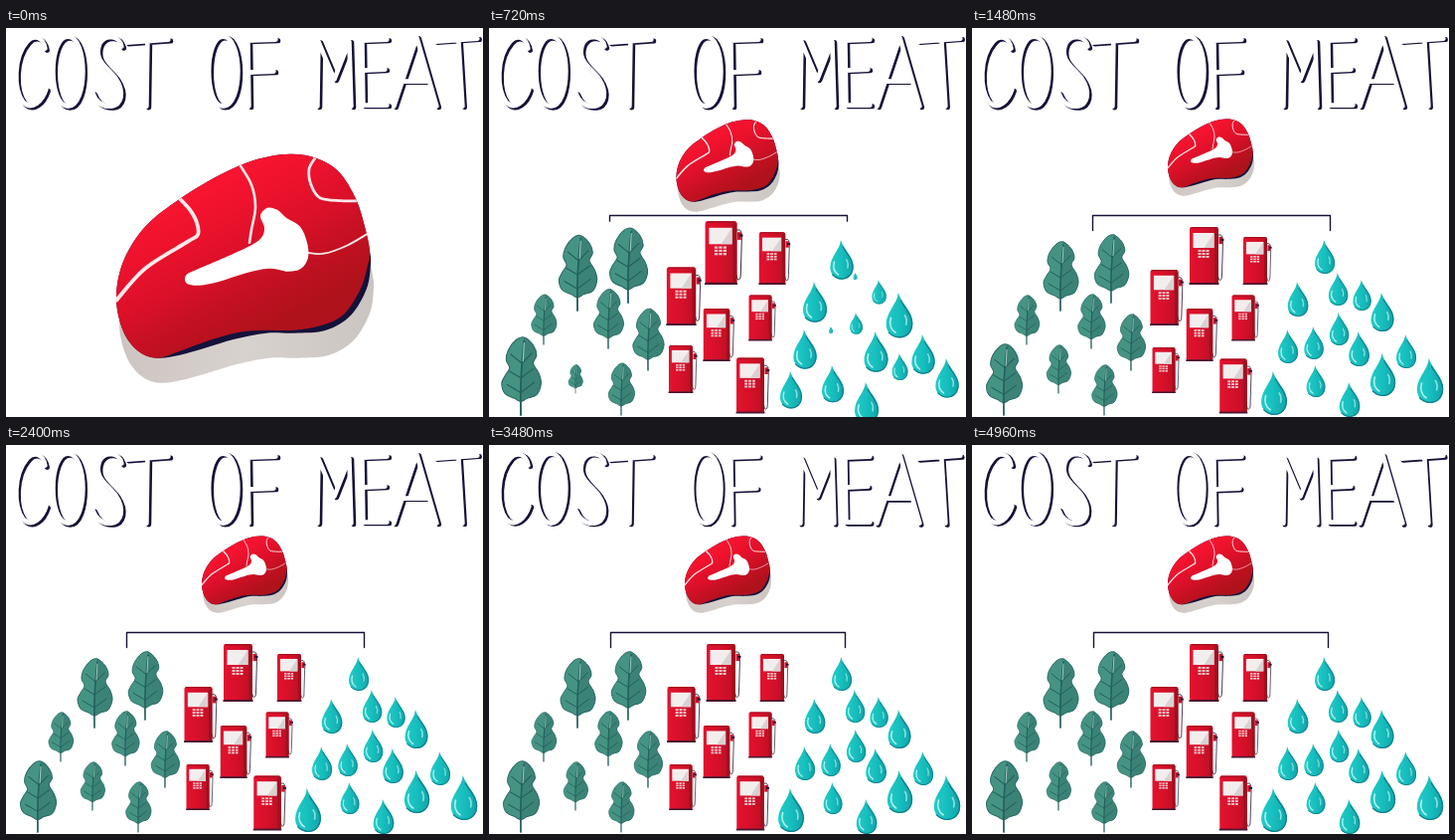
An HTML page with a canvas that plays this animation: 480x391 px, repeating every 5000 ms.

```html
<!DOCTYPE html>
<html lang="en">
<head>
<meta charset="utf-8">
<title>Cost of meat</title>
<style>
html, body { margin: 0; width: 100%; height: 100%; overflow: hidden; background: #fff; }
canvas { display: block; }
</style>
</head>
<body>
<canvas id="stage" width="480" height="391" role="img" aria-label="COST OF MEAT"></canvas>
<script>
const ctx = document.getElementById('stage').getContext('2d');
const LOOP = 5000, NAVY = '#15123a';
const clamp = v => Math.max(0, Math.min(1, v));
const easeOut = (u, p) => 1 - (1 - clamp(u)) ** p;
const easeInOut = (u, p) => {
  u = clamp(u);
  return u < .5 ? (2 * u) ** p / 2 : 1 - (2 - 2 * u) ** p / 2;
};
const pop = (ms, start, c) => {
  if (ms <= start) return 0;
  const v = clamp((ms - start) / 400) - 1;
  return 1 + (c + 1) * v ** 3 + c * v * v;
};

// Smooth path through "x,y x,y ..." points.
function curve(text, closed) {
  const p = text.split(' ').map(s => s.split(',').map(Number)), n = p.length;
  const at = i => closed ? p[(i + n) % n] : p[Math.max(0, Math.min(n - 1, i))];
  const path = new Path2D();
  path.moveTo(...p[0]);
  for (let i = 0; i < (closed ? n : n - 1); i++) {
    const [a, b, c, d] = [at(i - 1), at(i), at(i + 1), at(i + 2)];
    path.bezierCurveTo(b[0] + (c[0] - a[0]) / 6, b[1] + (c[1] - a[1]) / 6,
      c[0] - (d[0] - b[0]) / 6, c[1] - (d[1] - b[1]) / 6, c[0], c[1]);
  }
  if (closed) path.closePath();
  return path;
}
const fill = (path, color) => { ctx.fillStyle = color; ctx.fill(path); };
const line = (path, color, width) => {
  ctx.strokeStyle = color;
  ctx.lineWidth = width;
  ctx.stroke(path);
};
const rect = (x, y, w, h, color) => { ctx.fillStyle = color; ctx.fillRect(x, y, w, h); };
function placed(x, y, scale, draw) {
  if (scale <= 0) return;
  ctx.save();
  ctx.translate(x, y);
  ctx.scale(scale, scale);
  draw();
  ctx.restore();
}
function gradient(x0, y0, x1, y1, ...stops) {
  const g = ctx.createLinearGradient(x0, y0, x1, y1);
  stops.forEach((c, i) => g.addColorStop(i / (stops.length - 1), c));
  return g;
}

// Title
const letters = [
  'M40 21C38 10 29 6 22 14C8 30 8 62 18 75C27 84 37 74 41 62',
  'M63 9C43 9 43 79 63 79C83 79 83 9 63 9Z',
  'M117 19C115 8 101 6 95 16C88 33 103 40 111 51C121 66 116 78 107 79C97 80 91 74 88 66',
  'M122 15L164 12M143 14L142 79',
  'M219 9C200 9 200 79 219 79C239 79 239 9 219 9Z',
  'M243 13L272 12M244 13L245 79M245 45L270 44',
  'M314 79L315 14L331 52L346 14L348 79',
  'M359 13L384 12M359 13L360 78L384 78M360 43L382 42',
  'M391 79L414 10L434 79M399 54L426 54',
  'M433 14L475 11M456 13L460 79'
].map(d => new Path2D(d));
function title(beat) {
  letters.forEach((path, i) => {
    const wobble = k => Math.sin(i * 12.9 + beat * 2.4 + k) * .4;
    ctx.save();
    ctx.translate(1.4 + wobble(0), 1 + wobble(2));
    line(path, NAVY, 5);
    ctx.restore();
    ctx.save();
    ctx.translate(-.6, -.4);
    line(path, '#fff', 4.6);
    ctx.restore();
  });
}

// Steak, drawn at its opening size and place
const top_ = '111,272 118,235 140,200 175,172 215,148 250,133 285,127 312,131 335,145 352,172 361,200 366,224 ';
const flesh = curve(top_ + '363,243 356,264 340,288 318,299 290,304 262,304 235,306 205,314 175,325 152,332 133,325 118,305', true);
const rim = curve(top_ + '367,237 363,262 347,289 322,304 290,307 262,307 230,313 200,322 175,329 152,332 133,325 118,305', true);
const bone = curve('256,189 263,181 273,183 282,191 296,200 303,216 304,231 297,242 284,245 265,242 240,247 215,255 195,259 182,257 181,249 192,243 220,231 246,219 257,211 260,201', true);
const marbling = [
  ['111,274 140,242 183,215 193,208 192,196 185,183 174,171', 3.8],
  ['236,139 247,158 251,180 247,203 245,216', 2.6],
  ['311,131 305,142 307,158 316,171 337,174 354,174', 2.8],
  ['302,226 320,227 343,219 364,207', 1.8]
].map(([pts, w]) => [curve(pts), w]);
const meatRed = gradient(196, 152, 274, 298, '#fb1532', '#ee122d', '#dc1029', '#c31022', '#af121a');
function steak(ms) {
  const rise = easeOut(ms / 1500, 4), shrink = easeInOut(ms / 1040, 3.3);
  placed(239 + rise, 230 - 104 * rise, 1 - .664 * shrink, () => {
    ctx.translate(-239, -230);
    ctx.save();
    ctx.translate(3, 25);
    fill(rim, gradient(115, 0, 365, 0, '#cdc5c1', '#d8d2ce', '#cbc5c1'));
    ctx.restore();
    fill(rim, NAVY);
    fill(flesh, meatRed);
    ctx.save();
    ctx.clip(flesh);
    for (const [path, w] of marbling) line(path, '#ffe9e9', w);
    ctx.restore();
    fill(bone, '#fff');
  });
}

// Icons; leaves and pumps grow from the foot, drops from the tip
const leafShape = curve('3,-69 11,-62 14,-53 11,-46 16,-37 18,-28 14,-18 6,-15 0,-12 -6,-15 -14,-19 -17,-28 -14,-35 -10,-42 -13,-49 -11,-58 -4,-67', true);
const leafRib = curve('0,0 0,-25 1,-45 3,-66');
const leafVeins = new Path2D('M0 -20L12 -29M0 -20L-12 -27M0 -33L11 -41M0 -33L-10 -39M1 -46L10 -55M1 -46L-9 -54');
function leaf() {
  fill(leafShape, '#459483');
  ctx.save();
  ctx.clip(leafShape);
  ctx.beginPath();
  ctx.moveTo(0, 0);
  ctx.lineTo(3, -70);
  ctx.lineTo(25, -70);
  ctx.lineTo(25, 0);
  ctx.fillStyle = '#3a8376';
  ctx.fill();
  line(leafVeins, '#235d5c', 1);
  ctx.restore();
  line(leafShape, '#2b6b66', 1);
  line(leafRib, '#24605f', 1.7);
  line(new Path2D('M2 -48L3 -64'), '#a5cbc0', 1);
}

const hose = new Path2D('M14 -50L17 -50Q19 -49 19 -44L18 -10Q18 -3 15 -5L14 -9');
function pump() {
  line(hose, '#30283f', .9);
  ctx.beginPath();
  ctx.roundRect(-14.5, -58, 29, 57, 2);
  ctx.fillStyle = gradient(-14, 0, 14, 0, '#e3122e', '#d6102a', '#bc1024');
  ctx.fill();
  rect(11, -56, 3.5, 54, '#9e1020');
  rect(-13, -58, 26, 1.5, '#a90f20');
  rect(-11, -52, 21, 15, '#f3eeee');
  ctx.beginPath();
  ctx.moveTo(10, -52);
  ctx.lineTo(10, -37);
  ctx.lineTo(0, -37);
  ctx.fillStyle = '#d9d2d2';
  ctx.fill();
  for (let i = 0; i < 9; i++) {
    rect(-6 + i % 3 * 4, -35 + Math.floor(i / 3) * 3, 3, 2, '#f4c9cc');
  }
  rect(15, -48, 3.5, 7, '#c5122a');
  rect(17, -46, 3, 2, NAVY);
  rect(-15, -2, 30, 2, '#4a1630');
}

const dropShape = new Path2D('M-1 0C-1 8 -10 14 -10 24C-10 30 -5 34 0 34C6 34 10 30 10 23C10 14 2 9 -1 0Z');
function drop() {
  fill(dropShape, gradient(-10, 0, 10, 0, '#21cbc7', '#17bebd', '#10a5ab'));
  line(new Path2D('M1 6C4 12 9.5 16 9.5 23C9.5 30 5 33.5 0 33.5C-3 33.5 -6 32 -8 30'), '#127e8b', 1);
  line(new Path2D('M-6.5 19C-8 24 -6 28 -3 30'), '#b5f1ee', 1.3);
  line(new Path2D('M4 17Q6 20 5 24'), '#7fe2df', 1.3);
}

// [draw, natural height, overshoot, [x, y, height, start] ...]
const groups = [
  [leaf, 69, 1.7, [
    [89, 284, 69, 460], [140, 276, 68, 490], [55, 318, 49, 365], [120, 322, 54, 470],
    [160, 344, 56, 490], [32, 389, 71, 500], [87, 367, 48, 658], [133, 389, 50, 390]]],
  [pump, 58, 1.7, [
    [233.5, 258, 58, 490], [285, 258, 48, 490], [193.5, 299, 56, 400], [273, 314.5, 46, 325],
    [229, 335, 53, 312], [193, 367, 46, 400], [263, 387.5, 55, 365]]],
  [drop, 34, 2.3, [
    [355, 213, 34, 506], [328, 255, 35, 506], [368.5, 246, 33, 704], [392.5, 253, 31, 640],
    [413, 266, 39, 506], [318, 303, 34, 506], [344, 300, 33, 704], [369.5, 286, 33, 658],
    [389.5, 305, 35, 510], [437, 308, 34, 506], [413.5, 327, 43, 662], [304, 345, 44, 630],
    [346, 339, 32, 506], [380, 356, 35, 506], [461, 332, 45, 625]]]
];

function bracket(ms, beat) {
  const length = 135 * easeOut((ms - 360) / 490, 2);
  if (!length) return;
  const left = beat ? 122.5 : 121.5, right = beat ? 358.5 : 360.5;
  const reach = Math.min(1, length / 120), leg = Math.max(0, length - 120);
  const path = new Path2D();
  for (const end of [left, right]) {
    path.moveTo(241, 188.5);
    path.lineTo(241 + (end - 241) * reach, 188.5);
    if (leg) path.lineTo(end, 188.5 + leg);
  }
  line(path, NAVY, 1.4);
}

function frame(now) {
  const ms = now % LOOP, beat = Math.floor(ms / 120) % 2;
  rect(0, 0, 480, 391, '#fff');
  ctx.lineCap = ctx.lineJoin = 'round';
  title(beat);
  bracket(ms, beat);
  for (const [draw, size, overshoot, items] of groups) {
    for (const [x, y, height, start] of items) {
      placed(x, y, height / size * pop(ms, start, overshoot), draw);
    }
  }
  steak(ms);
  requestAnimationFrame(() => frame(performance.now() - began));
}
const began = performance.now();
frame(0);
</script>
</body>
</html>
```
